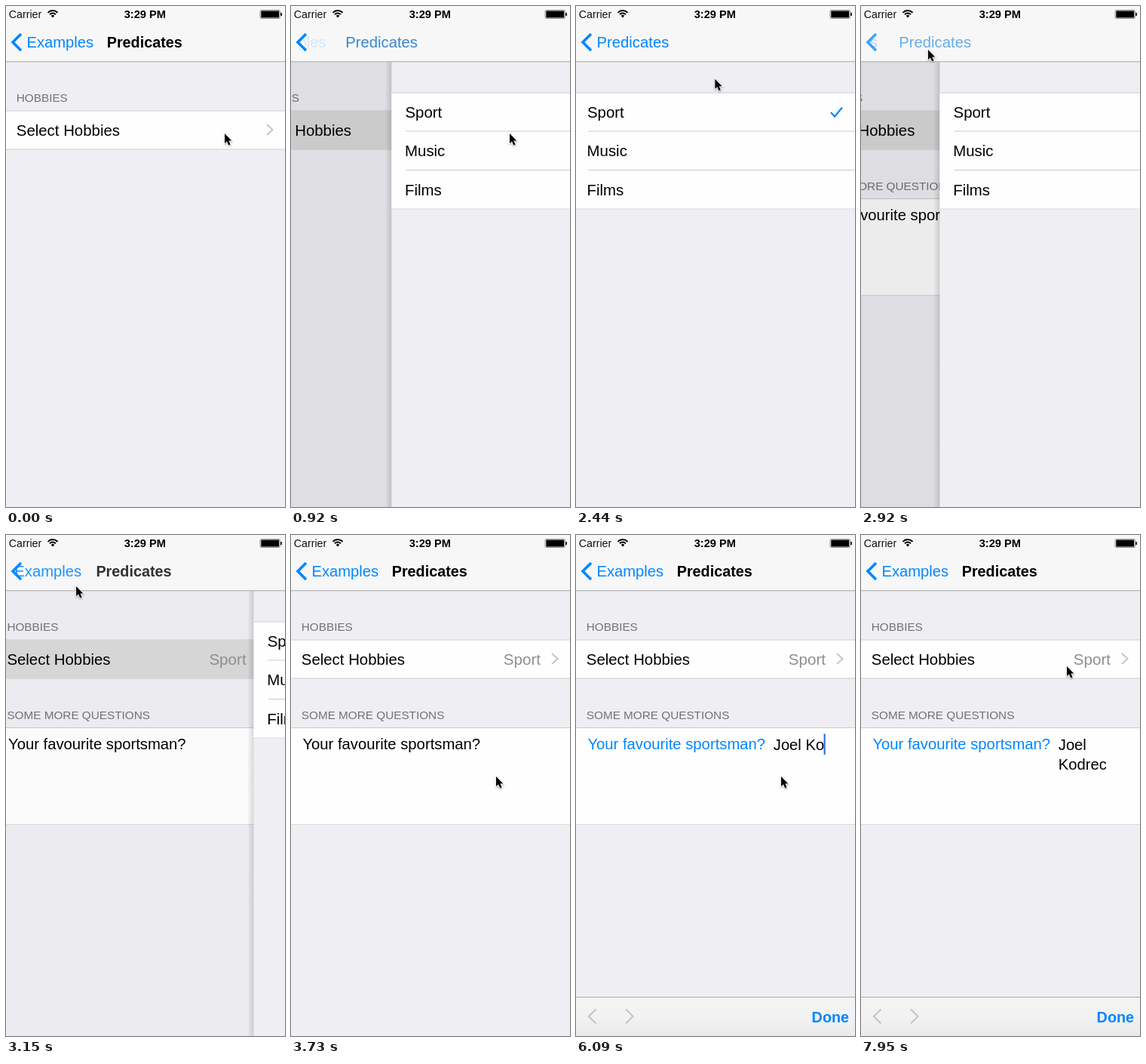
Recreate the animation shown at these times as an HTML page with a canvas. Size 370 px wide and 664 px high, loop 8 s.

```html
<!DOCTYPE html>
<html lang="en">
<head>
<meta charset="utf-8">
<title>Predicates form</title>
<style>
  html, body { margin: 0; width: 100%; height: 100%; overflow: hidden; background: #efeef3; }
  canvas { display: block; width: 370px; height: 664px; }
</style>
</head>
<body>
<canvas id="stage"></canvas>
<script>
const W = 370, H = 664, LOOP = 8000;
const BLUE = '#0087ff', PAGE = '#efeef3', LINE = '#cbcacf', SOFT_LINE = '#d9d8dd', GREY = '#727277';
const NAME = 'Joel Kodrec', WRAP_AT = 10, SPACE = NAME.indexOf(' ');
const KEY_TIMES = [4960, 5140, 5200, 5380, 5680, 5910, 6090, 6390, 6570, 6750, 7230];
const PUSH = 810, POP = 2800, EDIT = 4080, BLUR = 7770;

// Pointer stops: time, x, y
const POINTER = [
  [0, 290, 169], [1260, 290, 169], [1560, 289, 138], [1740, 293, 141],
  [2160, 293, 141], [2620, 89, 58], [3040, 89, 58], [3550, 195, 319],
  [3730, 272, 320], [7730, 272, 320], [7950, 273, 174]
];

const canvas = document.getElementById('stage');
const ctx = canvas.getContext('2d');
const dpr = window.devicePixelRatio || 1;
canvas.width = W * dpr;
canvas.height = H * dpr;

const clamp = v => Math.max(0, Math.min(1, v));
const mix = (a, b, k) => a + (b - a) * k;
const smooth = k => k * k * (3 - 2 * k);
const span = (t, a, b) => clamp((t - a) / (b - a));
const snap = (t, start, step) => start + Math.floor((t - start) / step) * step;

// Critically damped spring, from 0 to 1
function spring(ms, rate) {
  const x = Math.max(0, ms / 1000 * rate);
  return 1 - (1 + x) * Math.exp(-x);
}

function box(x, y, w, h, color) {
  ctx.fillStyle = color;
  ctx.fillRect(x, y, w, h);
}

function text(str, x, y, size, color, { bold = false, alpha = 1, align = 'left' } = {}) {
  ctx.save();
  ctx.globalAlpha *= clamp(alpha);
  ctx.font = `${bold ? 'bold ' : ''}${size}px "Liberation Sans", Arial, sans-serif`;
  ctx.textAlign = align;
  ctx.fillStyle = color;
  ctx.fillText(str, x, y);
  ctx.restore();
}

function stroke(points, color, width) {
  ctx.beginPath();
  points.forEach(([x, y]) => ctx.lineTo(x, y));
  ctx.strokeStyle = color;
  ctx.lineWidth = width;
  ctx.stroke();
}

// Arrow head with its tip at (x, y); negative w points right
const chevron = (x, y, w, h, color, width) =>
  stroke([[x + w, y - h], [x, y], [x + w, y + h]], color, width);

function cell(y, h, bottomLine = LINE) {
  box(0, y, W, h, '#fefefe');
  box(0, y, W, 1, LINE);
  box(0, y + h - 1, W, 1, bottomLine);
}

function drawForm(t) {
  box(0, 0, W, H, PAGE);
  text('HOBBIES', 13.8, 127, 15.3, GREY);
  cell(138.5, 52);
  if (t >= PUSH && t < 3550) {
    ctx.globalAlpha = 1 - span(snap(t, POP, 60), 3200, 3550);
    box(0, 138.5, W, 52, '#d9d9d9');
    ctx.globalAlpha = 1;
  }
  text('Select Hobbies', 13.8, 172, 20.4, '#000');
  chevron(353.5, 164, -7.5, 7, '#c7c7cc', 2.2);

  if (t < POP) return;
  text('Sport', 331, 172, 20.6, '#8e8e93', { align: 'right' });
  text('SOME MORE QUESTIONS', 13.8, 243.7, 15.3, GREY);
  cell(255, 129, SOFT_LINE);
  text('Your favourite sportsman?', 15.4, 283.8, 20.25, t < EDIT ? '#000' : BLUE);
  if (t >= EDIT) drawAnswer(t);
}

function drawAnswer(t) {
  const count = KEY_TIMES.filter(k => k <= t).length;
  const typed = NAME.slice(0, count);
  const lines = count < WRAP_AT ? [typed] : [typed.slice(0, SPACE), typed.slice(SPACE + 1)];
  lines.forEach((line, i) => text(line, 261.8, 284.5 + 26 * i, 20.2, '#000'));
  if (t >= BLUR) return;
  const last = lines.length - 1;
  ctx.font = '20.2px "Liberation Sans", Arial, sans-serif';
  const x = Math.max(263, 261.3 + ctx.measureText(lines[last]).width);
  box(x, 263.5 + 26 * last, 2, 27.5, '#1f66e5');
}

function drawList(t, inset) {
  box(0, 0, W, H, PAGE);
  cell(114.5, 155, SOFT_LINE);
  if (t >= 1980) {
    ctx.globalAlpha = 1 - span(snap(t, 1980, 60), 2040, 2400);
    box(0, 114.5, W, 52, '#d9d9d9');
    ctx.globalAlpha = 1;
    stroke([[338, 141], [343, 146.5], [353, 134.5]], BLUE, 2.2);
  }
  box(inset, 165.5, W, 1, LINE);
  box(inset, 217, W, 1, LINE);
  ['Sport', 'Music', 'Films'].forEach((name, i) =>
    text(name, inset - (i ? 1.4 : 1), 148 + 51.4 * i, 20.4, '#000'));
}

function drawPages(t, open) {
  ctx.save();
  ctx.translate(-0.3 * W * open, 0);
  drawForm(t);
  ctx.restore();
  if (open < 0.0005) return;

  box(0, 0, W, H, `rgba(0,0,0,${0.1 * open})`);
  ctx.save();
  ctx.translate(W * (1 - open), 0);
  const shade = ctx.createLinearGradient(-9, 0, 0, 0);
  shade.addColorStop(0, 'rgba(0,0,0,0)');
  shade.addColorStop(1, 'rgba(0,0,0,0.14)');
  box(-9, 0, 9, H, shade);
  // Rows sit slightly further in while the page slides
  drawList(t, 16 + 3 * clamp((1 - open) * 10));
  ctx.restore();
}

function drawNav(p, popping) {
  box(0, 0, W, 74, '#f7f7f8');
  box(0, 73, W, 1.4, '#bcbcbe');

  // Bar items lag slightly behind the pages
  const q = p ** 1.22;
  const moved = popping ? 1 - q : q;
  const bold = moved < 0.5;
  const titleX = mix(133.7, 27.5, moved);
  const titleSize = bold ? 19.8 : 20.3;
  const labelAlpha = popping ? (1 - p) * 0.75 : p && p + 0.06;
  const titleAlpha = popping ? p ** 2 : (1 - p) ** 1.65;
  const backAlpha = popping ? p : (1 - p) ** 2;

  ctx.save();
  ctx.beginPath();
  ctx.rect(11, 30, W, 40);
  ctx.clip();
  text('Examples', 27.5 - 120 * moved, 55, 20.2, BLUE, { alpha: backAlpha });
  ctx.restore();
  text('Predicates', titleX, 55, titleSize, BLUE, { bold, alpha: labelAlpha });
  text('Predicates', titleX, 55, titleSize, '#000', { bold, alpha: titleAlpha });

  ctx.globalAlpha = popping ? 0.65 + 0.35 * p : 1;
  chevron(9, 48, 11, 11, BLUE, 3.6);
  ctx.globalAlpha = 1;
}

function drawStatus() {
  text('Carrier', 3.8, 16, 14.2, '#111');
  text('3:29 PM', 156.7, 16, 14.6, '#000', { bold: true });

  // Wi-Fi
  ctx.strokeStyle = ctx.fillStyle = '#000';
  ctx.lineWidth = 2;
  for (const r of [5.4, 8.9]) {
    ctx.beginPath();
    ctx.arc(62, 15, r, -Math.PI * 0.76, -Math.PI * 0.24);
    ctx.stroke();
  }
  ctx.beginPath();
  ctx.moveTo(62, 15.5);
  ctx.arc(62, 15, 3, -Math.PI * 0.76, -Math.PI * 0.24);
  ctx.fill();

  // Battery
  ctx.strokeStyle = '#666';
  ctx.lineWidth = 0.7;
  ctx.beginPath();
  ctx.roundRect(337, 5.5, 26.5, 11, 1.8);
  ctx.stroke();
  box(338.3, 6.5, 23.9, 9, '#000');
  box(364.3, 9, 1.6, 4, '#000');
}

function drawToolbar(t) {
  if (t < EDIT) return;
  const rise = spring(snap(t, EDIT, 60) - EDIT + 20, 12);
  ctx.save();
  ctx.translate(0, 52 * (1 - rise));
  const fill = ctx.createLinearGradient(0, 612, 0, H);
  fill.addColorStop(0, '#f4f4f5');
  fill.addColorStop(0.5, '#f2f2f2');
  fill.addColorStop(1, '#eaeaea');
  box(0, 612, W, 52, fill);
  box(0, 612, W, 1, '#a9a9ac');
  chevron(17, 638, 9.5, 9.5, '#c3c3c5', 2);
  chevron(75.5, 638, -9.5, 9.5, '#c3c3c5', 2);
  text('Done', 312.6, 646, 19.8, BLUE, { bold: true });
  ctx.restore();
}

function drawPointer(t) {
  const next = POINTER.findIndex(stop => stop[0] > t);
  const end = next < 0 ? POINTER.length - 1 : next;
  const [t0, x0, y0] = POINTER[end - 1];
  const [t1, x1, y1] = POINTER[end];
  const k = t >= t1 ? 1 : smooth(span(snap(t, t0, 60), t0, t1));
  ctx.save();
  ctx.translate(mix(x0, x1, k), mix(y0, y1, k));
  ctx.beginPath();
  [[0, 0], [0, 13], [3, 10.4], [5.2, 15.4], [7.6, 14.4], [5.4, 9.6], [9.3, 9.4]]
    .forEach(([x, y]) => ctx.lineTo(x, y));
  ctx.closePath();
  ctx.shadowColor = 'rgba(0,0,0,0.35)';
  ctx.shadowBlur = 2 * dpr;
  ctx.shadowOffsetY = dpr;
  ctx.strokeStyle = '#fff';
  ctx.lineWidth = 1.8;
  ctx.stroke();
  ctx.shadowColor = 'transparent';
  ctx.fillStyle = '#000';
  ctx.fill();
  ctx.restore();
}

function draw(t) {
  const popping = t >= POP;
  let p = 0;
  if (popping) p = t >= 3550 ? 1 : spring(snap(t, POP, 60) - POP - 50, 15);
  else if (t >= PUSH) p = t >= 1560 ? 1 : spring(snap(t, PUSH, 55) - PUSH + 35, 15);

  ctx.setTransform(dpr, 0, 0, dpr, 0, 0);
  drawPages(t, popping ? 1 - p : p);
  drawNav(p, popping);
  drawStatus();
  drawToolbar(t);
  drawPointer(t);
}

const began = performance.now();
function tick() {
  draw((performance.now() - began) % LOOP);
  requestAnimationFrame(tick);
}
tick();
</script>
</body>
</html>
```
